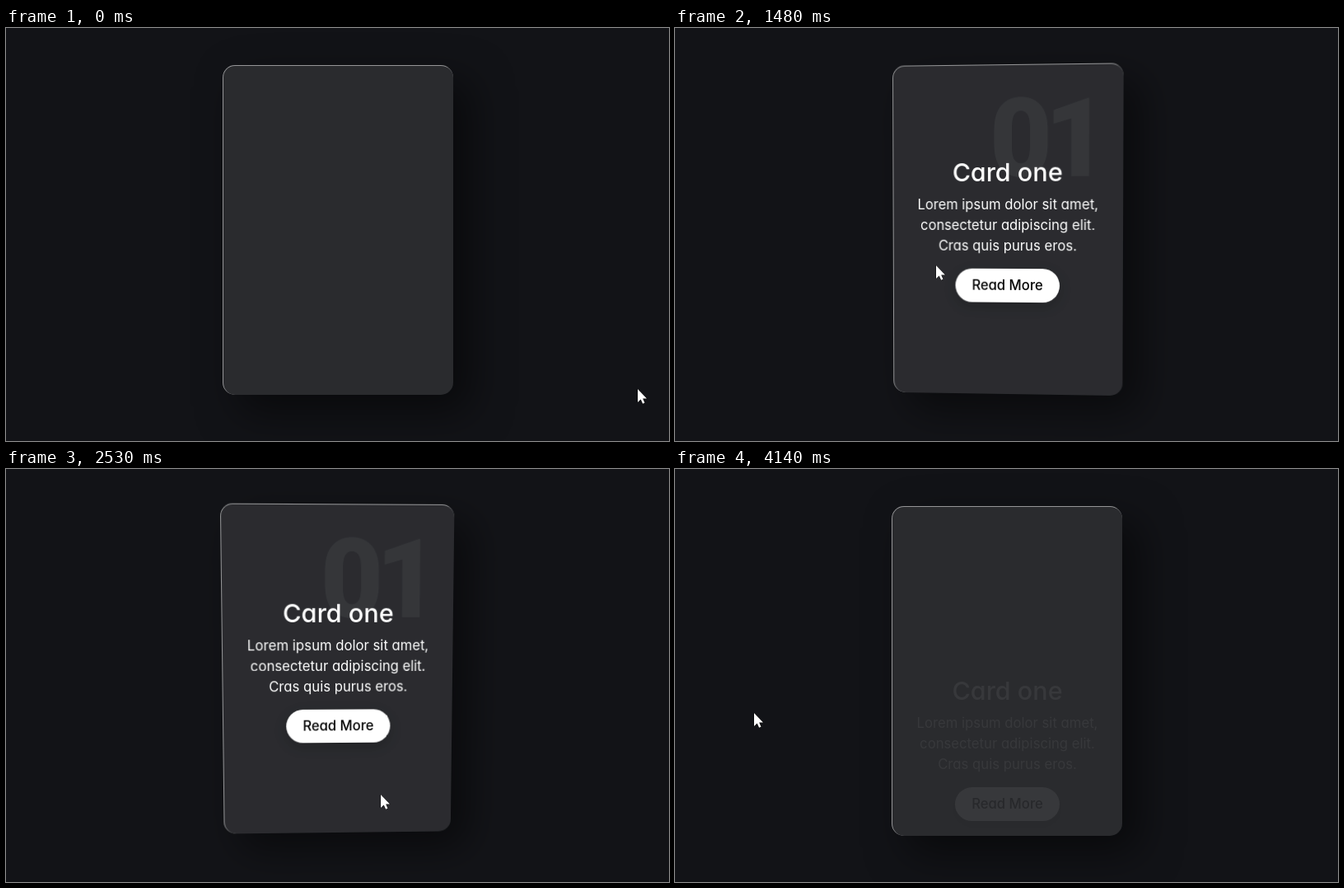
Write an HTML page that moves like this. It is 805 px wide and 501 px high and loops after 4.61 s.

```html
<!DOCTYPE html>
<html lang="en">
<head>
<meta charset="utf-8">
<title>Tilt card</title>
<style>
  html, body { margin: 0; width: 100%; height: 100%; overflow: hidden; background: #121317; }
  .stage { position: relative; width: 805px; height: 501px; overflow: hidden; }
  .card {
    position: absolute; left: 263px; top: 45px; width: 280px; height: 400px;
    box-sizing: border-box; border-radius: 15px;
    border-top: 1px solid rgba(255, 255, 255, .5);
    border-left: 1px solid rgba(255, 255, 255, .5);
    background: rgba(255, 255, 255, .1);
    box-shadow: 20px 20px 50px rgba(0, 0, 0, .5);
  }
  .content {
    position: absolute; inset: 0; opacity: 0; color: #fff; text-align: center;
    font: 400 16.7px/25px Inter, "Open Sans", sans-serif;
    font-feature-settings: "cv11"; font-optical-sizing: none;
  }
  .content > * { position: absolute; margin: 0; white-space: nowrap; }
  h2 {
    left: 118px; top: 19px; opacity: .05;
    font: 900 131px/140px Roboto, sans-serif; letter-spacing: -.07em;
  }
  h3 { left: 0; right: 0; top: 109px; font-size: 30.5px; font-weight: 450; line-height: 40px; }
  p { left: 0; right: 0; top: 156px; }
  .button {
    left: 76px; top: 246px; width: 127px; height: 41px; line-height: 41px;
    border-radius: 20.5px; background: #fff; color: #000; font-weight: 450;
    box-shadow: 0 5px 15px rgba(0, 0, 0, .2);
  }
  .cursor { position: absolute; left: 0; top: 0; overflow: visible; }
</style>
</head>
<body>
<div class="stage">
  <div class="card">
    <div class="content">
      <h2>01</h2>
      <h3>Card one</h3>
      <p>Lorem ipsum dolor sit amet,<br>consectetur adipiscing elit.<br>Cras quis purus eros.</p>
      <div class="button">Read More</div>
    </div>
  </div>
  <svg class="cursor" width="12" height="19">
    <path d="M0 0V16L3.7 12.6L6.1 17.8L8.5 16.8L6.2 11.6H11Z" fill="#fff" stroke="#000" stroke-width=".9" paint-order="stroke"/>
  </svg>
</div>
<script>
const LOOP = 4610, LAST = 4140, TICK = 70;
const ENTER = 686, LEAVE = 3790, MAX_TILT = 6.5;
const ORBIT_START = 920, ORBIT_END = 3650;
const [card, content, cursor] = ['.card', '.content', '.cursor'].map(s => document.querySelector(s));

// Orbit around the card: time, angle in degrees
const turns = [[920, -9], [1480, 161], [2110, 280], [2950, 560], [3650, 830]];

const clamp = (v, lo = 0, hi = 1) => Math.min(hi, Math.max(lo, v));
const lerp = (a, b, u) => a + (b - a) * u;
const easeOut = (u, power) => 1 - (1 - clamp(u)) ** power;

// CSS "ease" curve, solved by bisection
function ease(x) {
  x = clamp(x);
  if (x === 0 || x === 1) return x;
  let lo = 0, hi = 1, s;
  for (let i = 0; i < 24; i++) {
    s = (lo + hi) / 2;
    const bx = .75 * s * (1 - s) + s ** 3;
    if (bx < x) lo = s; else hi = s;
  }
  return .3 * s * (1 - s) ** 2 + 3 * s * s * (1 - s) + s ** 3;
}

function orbit(t) {
  const i = clamp(turns.findIndex(([end]) => t < end), 1, turns.length - 1);
  const [t0, a0] = turns[i - 1], [t1, a1] = turns[i];
  const angle = lerp(a0, a1, (t - t0) / (t1 - t0)) * Math.PI / 180;
  const size = lerp(.77, 1, clamp((t - ORBIT_START) / 1190));
  return [403 + 103 * size * Math.cos(angle), 235 + 185 * size * Math.sin(angle)];
}

const glide = (from, to, u, powers) => from.map((v, k) => lerp(v, to[k], easeOut(u, powers[k])));

// Glide in, circle over the card, glide out
function pointer(t) {
  if (t < ORBIT_START) return glide([767, 438], orbit(ORBIT_START), t / ORBIT_START, [1.2, 2.1]);
  if (t < ORBIT_END) return orbit(t);
  return glide([367, 410], [96, 296], (t - ORBIT_END) / (LAST - ORBIT_END), [2.9, 2]);
}

const hover = (t, duration) =>
  t < LEAVE ? ease((t - ENTER) / duration) : 1 - ease((t - LEAVE) / duration);

// Brief loss of hover as the pointer grazes the top edge
const graze = t => .06 * Math.max(0, 1 - Math.abs(t - 2130) / 110);

function draw(t) {
  const [x, y] = pointer(t);
  const tilt = hover(t, 300) * MAX_TILT;
  const rx = (1 - 2 * clamp((y - 45) / 400)) * tilt;
  const ry = (2 * clamp((x - 263) / 280) - 1) * tilt;
  card.style.transform = tilt ? `perspective(1000px) rotateX(${rx}deg) rotateY(${ry}deg)` : 'none';
  const shown = hover(t, 500) - graze(t);
  content.style.opacity = shown;
  content.style.transform = `translateY(${100 * (1 - shown)}px)`;
  cursor.style.transform = `translate(${Math.round(x)}px, ${Math.round(y)}px)`;
}

const start = performance.now();
function tick() {
  const t = (performance.now() - start) % LOOP;
  const shift = t < 570 ? 0 : 10;
  draw(Math.min(LAST, Math.floor((t - shift) / TICK) * TICK + shift));
  requestAnimationFrame(tick);
}
tick();
</script>
</body>
</html>
```
